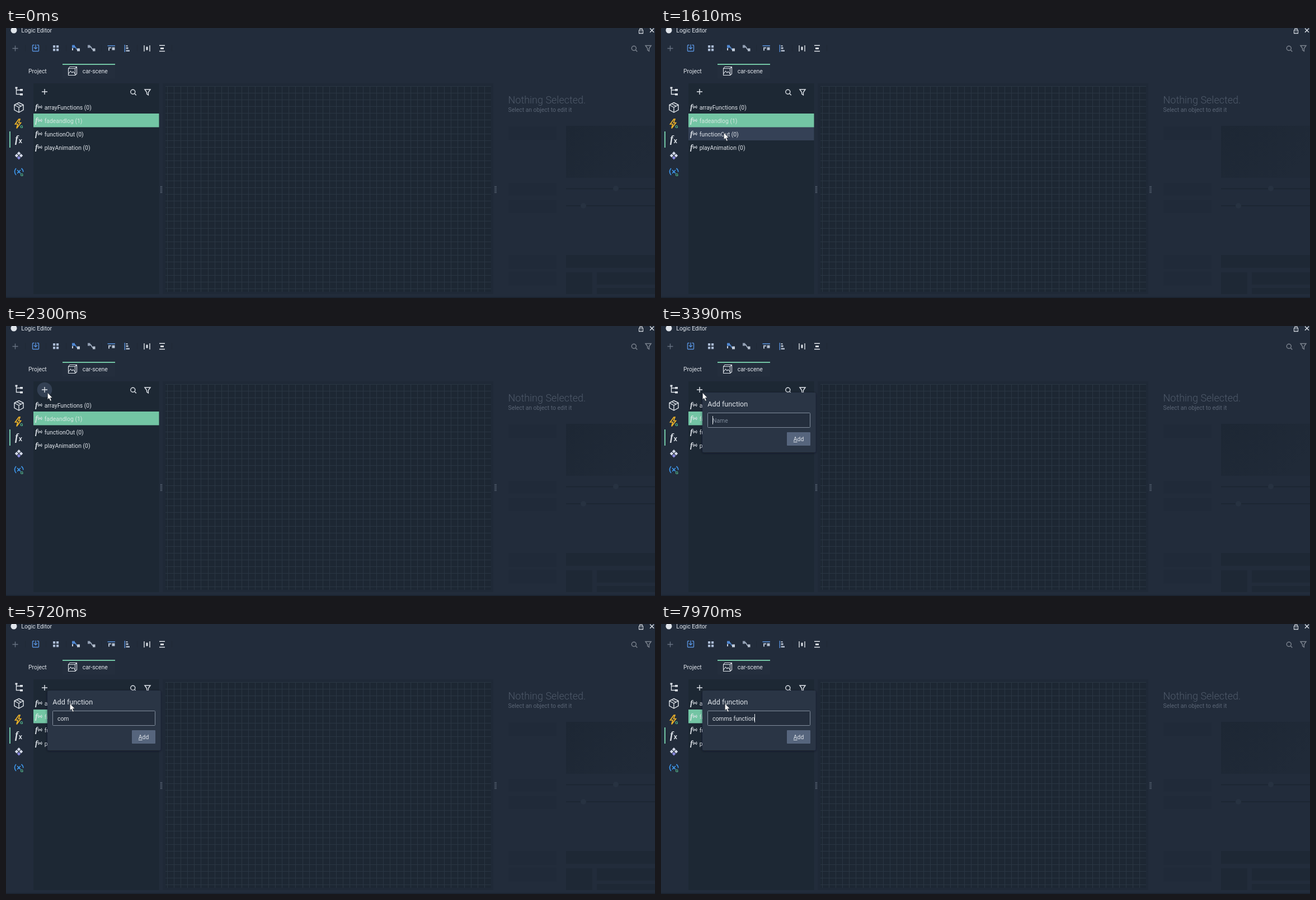
Animation of 1160x483 px, one loop 8 s. Source, as an HTML page:

```html
<!DOCTYPE html>
<html lang="en">
<head>
<meta charset="utf-8">
<title>Logic Editor</title>
<style>
  html, body { margin: 0; width: 100%; height: 100%; overflow: hidden; background: #222c3b; }
  svg { display: block; font: 10.4px Roboto, sans-serif; fill: #dfe4ea; }
  text { white-space: pre; }
  .line { fill: none; stroke: #dfe4ea; stroke-width: 1.4; }
  .thin { stroke-width: 1.1; }
  .bold { stroke-width: 1.7; }
  .dim { stroke: #677282; }
  .blue { stroke: #5791dc; }
  .soft { stroke: #a9b7ca; }
  .serif { font-family: 'Liberation Serif', serif; font-style: italic; font-weight: 700; }
  .badge { font-size: 8px; font-weight: 700; fill: #55b98e; }
</style>
</head>
<body>
<svg width="1160" height="483" viewBox="0 0 1160 483">
  <defs>
    <filter id="shadow" x="-20%" y="-20%" width="140%" height="140%">
      <feDropShadow dx="0" dy="1" stdDeviation="2" flood-color="#0b111a" flood-opacity=".6"/>
    </filter>
    <linearGradient id="fade" x2="1" y2=".6">
      <stop stop-color="#1d2734"/><stop offset="1" stop-color="#202a38"/>
    </linearGradient>
    <g id="search" class="line"><circle cx="-.7" cy="-.7" r="4"/><path d="M2.2 2.2L5.3 5.3"/></g>
    <path id="funnel" class="line" d="M-5 -5H5L1.4 0V5L-1.4 3V0Z"/>
    <g id="fn">
      <text class="serif" x="52" y="4" font-size="14">f</text>
      <path class="line thin" d="M58.5 -3Q56.500 -.5 58.500 2.500M63 -3Q65 -.5 63 2.500M59.500 -1.500L62 1.200M62 -1.500L59.500 1.200"/>
    </g>
  </defs>

  <rect width="1160" height="483" fill="#222c3b"/>
  <path d="M0 482H1160" stroke="#1c2532" stroke-width="2"/>

  <!-- title bar -->
  <circle cx="14" cy="4" r="5.5"/>
  <text x="27.3" y="8">Logic Editor</text>
  <path class="line thin" d="M1131.5 3.8H1138.5V9.6H1131.5ZM1133 3.5V1.2Q1135 -1 1137 1.2V3.5M1135 6V7.6"/>
  <path class="line" d="M1151 .8L1158 7.8M1158 .8L1151 7.8"/>

  <!-- toolbar -->
  <path class="line dim" d="M11.5 36.5H21.5M16.5 31.5V41.5"/>
  <path stroke="#1f2835" d="M34.5 30V42M71.5 30V42M107.5 30V42M170.5 30V42M234.5 30V42M296.5 30V42"/>
  <path class="line blue" d="M50.5 30.5H48.5Q47.5 30.5 47.5 31.5V40.5Q47.5 41.5 48.5 41.5H57.5Q58.5 41.5 58.5 40.5V31.5Q58.5 30.5 57.5 30.5H55.5"/>
  <path class="line blue" d="M53 29.5V37.5M50 34.5L53 37.5L56 34.5"/>
  <path fill="#a9bad3" d="M84 31h4.2v4.2h-4.2zM90 31h4.2v4.2h-4.2zM84 37h4.2v4.2h-4.2zM90 37h4.2v4.2h-4.2z"/>
  <path fill="#4f86d0" d="M118 30.5h5v5h-5z"/>
  <path class="line blue" d="M121 33C127 33 123 39 129 39"/>
  <path fill="#c3cddb" d="M127 36.5h5v5h-5zM118 36h2v4h-2z"/>
  <path fill="#8f9cb0" d="M146 30.5h4.5v5h-4.5z"/>
  <path class="line soft" d="M149 33C155 33 151 39 157 39"/>
  <path fill="#b4bfce" d="M155 36.5h4.5v5h-4.5z"/>
  <path class="line blue" d="M181.5 31.7H195M212.3 30V43"/>
  <path fill="#b4c0d1" d="M183 34.5h5v2h-3v4h-2zM189.500 34.500h5v5h-5zM214.5 31h3v2h-3zM214.5 34.5h4v3h-4zM214.5 39.5h6.5v2.5h-6.5z"/>
  <path class="line" d="M247 31V42M257 31V42M274 31.2H284M274 41.5H284"/>
  <path d="M250.5 33.5h3v6h-3zM276 35h6v3h-6z"/>
  <g opacity=".48">
    <use href="#search" x="1123" y="37"/><use href="#funnel" x="1148" y="36.5"/>
  </g>

  <!-- tabs -->
  <text x="40" y="81">Project</text>
  <path fill="#242e3d" d="M101 65h94v25h-94z"/>
  <path fill="#73c5a4" d="M101 64h94v2h-94z"/>
  <path class="line thin" d="M111.5 72.5H123.5V84.5H111.5ZM111.5 72.5L114 69.5H126.5V82L123.5 84.5M123.5 72.5L126.5 69.5M111.5 82L115.5 77L118 80L120 78L123.5 82"/>
  <text x="136.7" y="81">car-scene</text>

  <!-- side icons -->
  <path fill="#73c5a4" d="M6 185h2v29h-2z"/>
  <path class="line" d="M18.5 106V118.5H25M18.5 111H25"/>
  <path d="M16.5 105.5h4v3h-4zM25 109h5v3.5h-5zM25 117h5v3.5h-5z"/>
  <path class="line" d="M23 133.5L31 137.5V146.5L23 151L15 146.5V137.5ZM15 137.5L23 142L31 137.5M23 142V151M19 135.5L27 139.8"/>
  <path class="line bold" style="stroke:#f0b429" d="M23 163L16.5 172H21L19 179.5L26.5 169.5H22.5L25 163Z"/>
  <text class="badge" x="25" y="179">G</text>
  <text class="serif" x="16" y="205" font-size="18">f</text>
  <text x="22.500" y="206" font-size="13" font-weight="500">x</text>
  <path fill="#d5dbea" d="M23 221l3.2 3.2-3.2 3.2-3.2-3.2zM19 225l3.2 3.2-3.2 3.2-3.2-3.2zM27 225l3.2 3.2-3.2 3.2-3.2-3.2z"/>
  <path fill="#8b8be0" d="M23 229l3.2 3.2-3.2 3.2-3.2-3.2z"/>
  <path class="line bold" style="stroke:#3d94e6" d="M18 251Q13 257 18 263M27.5 251Q31.5 254.5 30.5 257.5M20 254L26 260M26 254L20 260"/>
  <text class="badge" x="25.5" y="264.5">G</text>

  <!-- function list -->
  <path fill="#1d2834" d="M49 99h224.5v377h-224.5z"/>
  <circle id="plusHover" cx="69" cy="114" r="13.3" fill="#334053"/>
  <path class="line" d="M64 114H74M69 109V119"/>
  <use href="#search" x="227.5" y="115"/><use href="#funnel" x="253" y="115"/>
  <rect id="rowHover" x="49" width="224.5" height="24" fill="#354156"/>
  <path fill="#73c5a4" d="M49 153h224.5v24.5h-224.5z"/>
  <g id="rows"></g>

  <!-- canvas -->
  <path fill="#1f2937" d="M280 99h591v377h-591z"/>
  <path fill="#1d2733" d="M285 104h582v368h-582z"/>
  <path id="grid" stroke="#2a3643"/>
  <path stroke="#8793a3" stroke-dasharray="1.2 1.5" d="M276.5 283V296M278.5 283V296M874 283V296M876 283V296"/>

  <!-- inspector -->
  <text x="897.5" y="134.5" font-size="18" font-weight="300" fill="#4f5a6a">Nothing Selected.</text>
  <text x="897.5" y="150" fill="#596474">Select an object to edit it</text>
  <path fill="#202a39" d="M898 176h86v24h-86zM898 277h86v23h-86zM898 308h86v23h-86zM898 406h86v25h-86zM898 436h86v25h-86z"/>
  <path fill="url(#fade)" d="M1001 175h159v93h-159z"/>
  <path fill="#1e2835" d="M1001 406h159v23h-159zM1001 437h47v39h-47zM1056 437h104v22h-104zM1056 465h104v11h-104z"/>
  <path stroke="#1c2633" stroke-width="2" d="M1001 287.5H1160M1001 318H1160"/>
  <g fill="#273241"><circle cx="1090" cy="287" r="5"/><circle cx="1032" cy="318" r="5"/></g>

  <!-- dialog -->
  <rect id="seed" x="74" y="119" width="54" height="47" rx="2" fill="#293445" filter="url(#shadow)"/>
  <g id="dialog">
    <rect x="74" y="119" width="202.5" height="107" rx="2" fill="#293444" filter="url(#shadow)"/>
    <text x="83.3" y="144" font-size="12.65">Add function</text>
    <rect x="83.5" y="155.5" width="183" height="26" rx="1" fill="#242e3d" stroke="#828e9e"/>
    <text id="entry" x="92" y="172.5"></text>
    <path id="caret" d="M.5 161V176" stroke="#e8ecf0"/>
    <rect x="225" y="190" width="42" height="24" rx="1" fill="#56657d"/>
    <text x="236.8" y="206"><tspan text-decoration="underline">A</tspan>dd</text>
  </g>
  <path id="cursor" d="M.3 .3V12.7L3 10.2L5.1 15.2L7.3 14.3L5.2 9.5H9Z" fill="#fff" stroke="#111820" stroke-width=".6"/>
</svg>
<script>
const LOOP = 8000;
const $ = id => document.getElementById(id);
const show = (id, on) => $(id).style.display = on ? '' : 'none';

$('rows').innerHTML = ['arrayFunctions (0)', 'fadeandlog (1)', 'functionOut (0)', 'playAnimation (0)']
  .map((name, i) => {
    const y = 141.5 + 24 * i;
    return `<g${i === 1 ? ' fill="#d3e6df"' : ''}><use href="#fn" y="${y}"/><text x="68.7" y="${y + 4}">${name}</text></g>`;
  }).join('');

const CELL = 12.07;
let lines = '';
for (let x = 288.6; x < 867; x += CELL) lines += `M${Math.floor(x) + .5} 104V472`;
for (let y = 104.6; y < 472; y += CELL) lines += `M285 ${Math.floor(y) + .5}H867`;
$('grid').setAttribute('d', lines);

// Pointer runs: first step, last step, number of steps, end x, end y
const runs = [
  [130, 130, 1, 915, 427], [210, 290, 2, 742, 363], [590, 740, 3, 314, 303],
  [990, 1140, 3, 156, 251], [1460, 1460, 1, 137, 225], [1530, 1610, 2, 112, 187],
  [1690, 1840, 3, 83, 138], [1920, 2230, 5, 74, 120], [2300, 2300, 1, 74, 119],
  [3860, 4160, 5, 114, 142]
];
const phrase = 'comms function';
const keyTimes = [4710, 4860, 5090, 5780, 5950, 6560, 6790, 6960, 7110, 7200, 7590, 7665, 7740, 7970];
const between = (t, a, b) => t >= a && t < b;

function pointer(t) {
  let from = null, at = null;
  for (const [start, end, n, x, y] of runs) {
    if (t < start) break;
    const step = n > 1 ? Math.min(n, 1 + Math.floor((t - start) / (end - start) * (n - 1))) : 1;
    const k = step / n;
    at = from ? [from[0] + (x - from[0]) * k, from[1] + (y - from[1]) * k] : [x, y];
    from = [x, y];
  }
  return at && at.map(Math.round);
}

function draw(t) {
  const at = pointer(t), open = t >= 3390;
  show('cursor', at);
  if (at) $('cursor').setAttribute('transform', `translate(${at})`);

  const [x, y] = at || [-99, -99];
  const row = Math.floor((y - 129) / 24);
  show('rowHover', !open && between(x, 49, 273) && between(row, 0, 4));
  $('rowHover').setAttribute('y', 129 + 24 * row);
  show('plusHover', !open && Math.hypot(x - 69, y - 114) < 13.3);

  show('seed', between(t, 3160, 3390));
  show('dialog', open);
  if (!open) return;
  const count = keyTimes.filter(k => t >= k).length;
  const entry = $('entry');
  entry.textContent = count ? phrase.slice(0, count) : 'Name';
  entry.setAttribute('fill', count ? '#dfe4ea' : '#7b8797');
  const width = count ? entry.getComputedTextLength() : 0;
  $('caret').setAttribute('transform', `translate(${Math.floor(92 + width)})`);
  show('caret', !between(t, 3935, 4390) && !between(t, 5720, 5780));
}

function tick() {
  draw(performance.now() % LOOP);
  requestAnimationFrame(tick);
}
tick();
</script>
</body>
</html>
```
